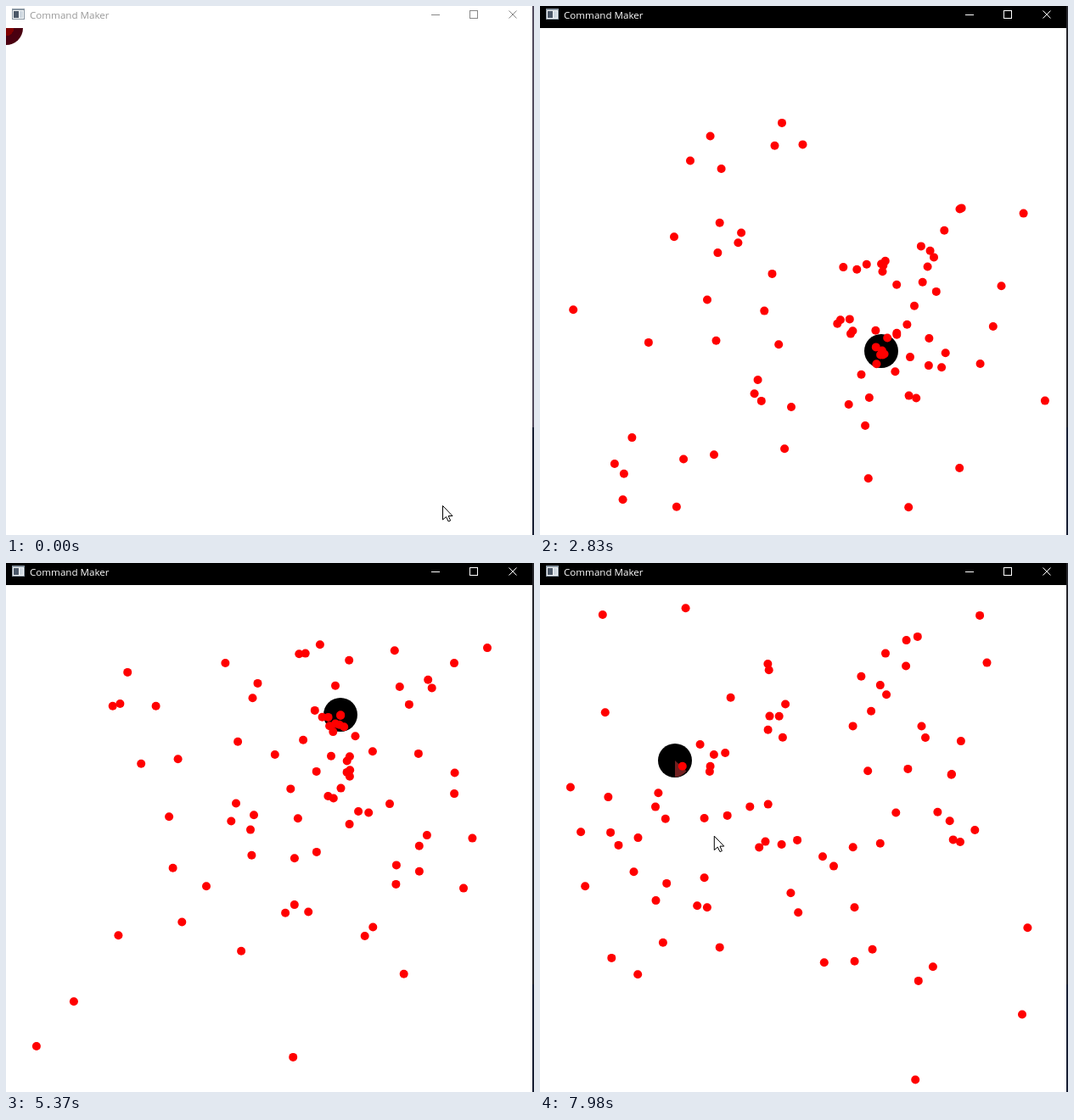
An HTML page for the animation above (8 s loop, 622 by 624 pixels).

```html
<!DOCTYPE html>
<html lang="en">
<head>
<meta charset="utf-8">
<title>Command Maker</title>
<style>
  html, body { margin: 0; width: 100%; height: 100%; overflow: hidden; background: #fff; }
  svg { display: block; width: 622px; height: 624px; }
  text { font: 11.6px "Open Sans", "Noto Sans", sans-serif; }
</style>
</head>
<body>
<svg viewBox="0 0 622 624">
  <rect width="622" height="624" fill="#fff"/>
  <circle id="core" r="20"/>
  <path id="wedge" d="M159 233L172.5 245.5Q167 252 159 252.5Z" fill="#702020"/>
  <g id="dots" stroke-width="8"></g>
  <path id="cursor" d="M.5.5V17L4.5 13.5L7.2 19L9.6 18L7.2 12.5H12Z" fill="#fff" stroke="#000"/>
  <rect id="bar" width="622" height="26"/>
  <g shape-rendering="crispEdges">
    <rect x="7" y="3" width="15" height="13" fill="#8a97a3"/>
    <rect x="8" y="5" width="13" height="10" fill="#f2f4f6"/>
    <rect x="9" y="6" width="6" height="8" fill="#4c5868"/>
    <rect x="16" y="6" width="4" height="8" fill="#cfd8e0"/>
  </g>
  <text id="label" x="28" y="15">Command Maker</text>
  <g id="buttons" fill="none">
    <path d="M501 10.5H511M546.5 5.5H555.5V14.5H546.5Z" shape-rendering="crispEdges"/>
    <path d="M592.5 5.5L601.5 14.5M601.5 5.5L592.5 14.5"/>
  </g>
  <rect id="edge" x="620" width="2" height="624"/>
  <rect x="620" y="497" width="2" height="127" fill="#161d31"/>
</svg>
<script>
const LOOP = 8000, COUNT = 84, BURST = 250, PULL = 430;
const $ = id => document.getElementById(id);
const clamp = x => Math.max(0, Math.min(1, x));
const smooth = x => { x = clamp(x); return x * x * (3 - 2 * x); };
const mix = (a, b, u) => a + (b - a) * u;

let seed = 7;
const rnd = () => (seed = seed * 16807 % 2147483647) / 2147483647;

// Every click moves the core and throws the dots to random spots in the window.
const clicks = [
  { at: -1e6, x: 0, y: 26 },
  { at: 450, x: 402, y: 407 },
  { at: 2300, x: 402, y: 407 },
  { at: 3050, x: 101, y: 419 },
  { at: 4810, x: 394, y: 179 },
  { at: 6200, x: 362, y: 538 },
  { at: 7515, x: 159, y: 233 }
];
for (const c of clicks) {
  c.spots = Array.from({ length: COUNT }, () => ({ x: 620 * rnd(), y: 26 + 598 * rnd(), keep: rnd() }));
}

const dots = Array.from({ length: COUNT }, () => {
  const dot = document.createElementNS("http://www.w3.org/2000/svg", "circle");
  dot.setAttribute("r", 5);
  return $("dots").appendChild(dot);
});

// Dots burst out to their spots, then fall to the core, each at its own rate.
function place(n, i, t) {
  const c = clicks[n], spot = c.spots[i], age = t - c.at;
  if (age < BURST) {
    const from = place(n - 1, i, c.at), u = 1 - (1 - age / BURST) ** 2;
    return { x: mix(from.x, spot.x, u), y: mix(from.y, spot.y, u) };
  }
  const k = spot.keep ** ((age - BURST) / PULL);
  return { x: mix(c.x, spot.x, k), y: mix(c.y, spot.y, k) };
}

const trips = [
  { from: 0, to: 450, x0: 514, y0: 589, x1: 402, y1: 407 },
  { from: 4300, to: 4810, x0: 383, y0: 196, x1: 394, y1: 179 },
  { from: 5952, to: 6200, x0: 496, y0: 436, x1: 362, y1: 538 },
  { from: 7515, to: 8000, x0: 159, y0: 233, x1: 205, y1: 322 }
];

function drawCursor(t) {
  const trip = trips.find(p => t >= p.from && t < p.to);
  $("cursor").style.display = trip ? "" : "none";
  if (!trip) return;
  const u = smooth((t - trip.from) / (trip.to - trip.from));
  $("cursor").setAttribute("transform",
    `translate(${mix(trip.x0, trip.x1, u)} ${mix(trip.y0, trip.y1, u)})`);
}

function draw(t) {
  const idle = t < 70;
  const n = clicks.findLastIndex(c => t >= c.at);

  $("core").setAttribute("cx", clicks[n].x);
  $("core").setAttribute("cy", clicks[n].y);
  $("core").setAttribute("fill", idle ? "#4a0010" : "#000");
  $("wedge").style.display = t > 7850 ? "" : "none";
  $("dots").setAttribute("fill", idle ? "#800000" : "#f00");
  $("dots").setAttribute("stroke", idle ? "#800000" : "none");
  dots.forEach((dot, i) => {
    const p = place(n, i, t);
    dot.setAttribute("cx", p.x.toFixed(1));
    dot.setAttribute("cy", p.y.toFixed(1));
  });

  $("bar").setAttribute("fill", idle ? "#fff" : "#000");
  $("label").setAttribute("fill", idle ? "#999" : "#fff");
  $("buttons").setAttribute("stroke", idle ? "#888" : "#fff");
  $("edge").setAttribute("fill", idle ? "#504a5c" : "#24242a");
  drawCursor(t);
}

const begin = performance.now();
function tick() {
  draw((performance.now() - begin) % LOOP);
  requestAnimationFrame(tick);
}
tick();
</script>
</body>
</html>
```
